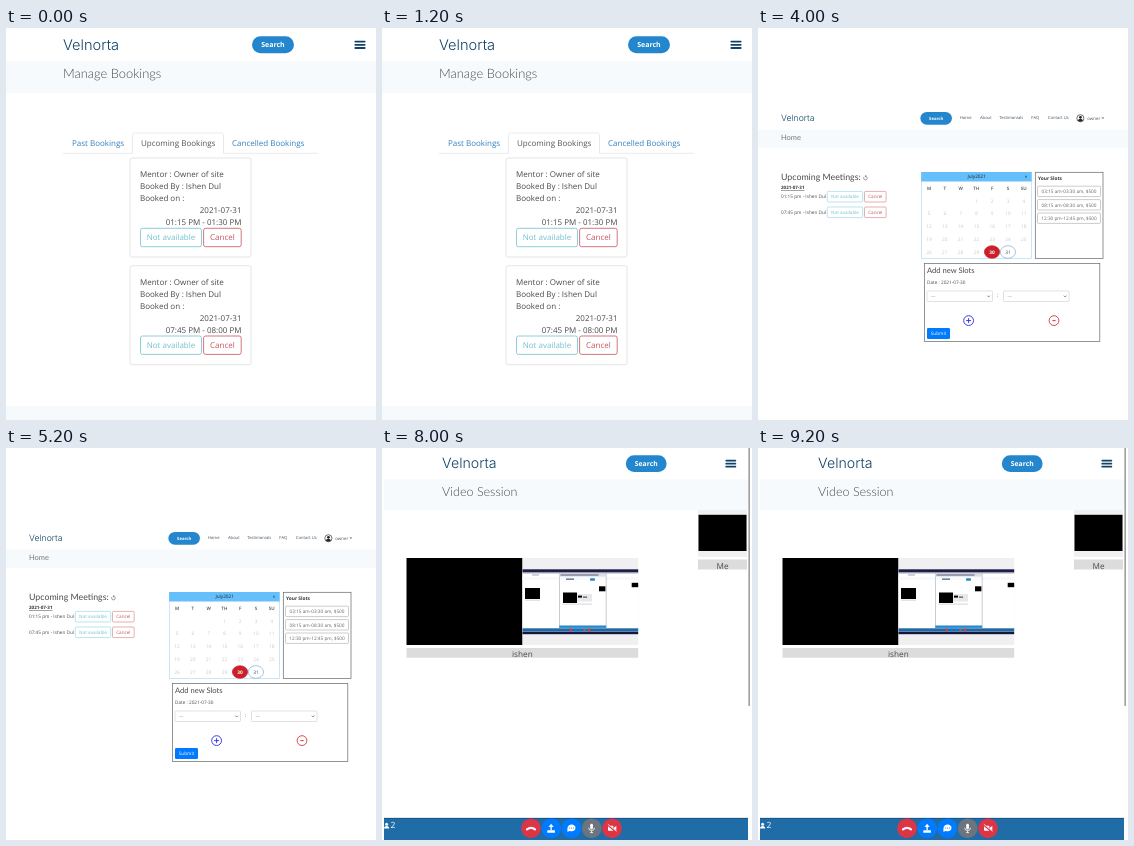
Recreate the animation shown at these times as an HTML page. Size 370x392 px, loop 10 s.

```html
<!DOCTYPE html>
<html lang="en">
<head>
<meta charset="utf-8">
<title>Booking walkthrough</title>
<style>
html, body { margin: 0; width: 100%; height: 100%; overflow: hidden; background: #fff; }
svg { display: block; width: 370px; height: 392px; }
text { font-family: "Open Sans", sans-serif; fill: #4a4a4a; white-space: pre; text-rendering: geometricPrecision; }
.head { font-family: Lato, sans-serif; }
.logo { font-family: Inter, sans-serif; }
.sans { font-family: "Liberation Sans", Arial, sans-serif; }
.blur { filter: blur(1.2px); }
</style>
</head>
<body>
<svg id="stage" viewBox="0 0 370 392" xmlns="http://www.w3.org/2000/svg"></svg>
<script>
const BRAND = 'Velnorta', PERSON = 'Ishen Dul', USER = 'owner', PAY = 'ZimLor';
const FIRST = PERSON.split(' ')[0];
const BLUE = '#2487ce', LINK = '#3481bd', NAVY = '#124265', BAND = '#f6fafd', RED = '#dc3545', ROSE = '#c9525d', TEAL = '#6fc2d0';
const SLOTS = ['03:15 am-03:30 am, $500', '08:15 am-08:30 am, $500', '12:30 pm-12:45 pm, $500'];

const attrs = o => Object.entries(o).map(([k, v]) => ` ${k}="${v}"`).join('');
const ink = c => ({ style: 'fill:' + c });
const bold = c => ({ 'font-weight': 700, ...ink(c) });
const text = (x, y, s, size, o = {}) =>
  `<text x="${x}" y="${y}" font-size="${size}"${attrs(o)}>${s.replace(/&/g, '&amp;')}</text>`;
const mid = (x, y, s, size, o = {}) => text(x, y, s, size, { 'text-anchor': 'middle', ...o });
const end = (x, y, s, size, o = {}) => text(x, y, s, size, { 'text-anchor': 'end', ...o });
const title = (x, y, s, size, o = {}) => text(x, y, s, size, { class: 'head', ...o });
const rect = (x, y, w, h, fill, o = {}) =>
  `<rect x="${x}" y="${y}" width="${w}" height="${h}" fill="${fill}"${attrs(o)}/>`;
const frame = (x, y, w, h, color, o = {}) => rect(x, y, w, h, 'none', { stroke: color, 'stroke-width': .7, ...o });
const disc = (x, y, r, fill, o = {}) => `<circle cx="${x}" cy="${y}" r="${r}" fill="${fill}"${attrs(o)}/>`;
const ring = (x, y, r, color, w) => disc(x, y, r, 'none', { stroke: color, 'stroke-width': w });
const line = (d, color, w = 1, o = {}) => `<path d="${d}" fill="none" stroke="${color}" stroke-width="${w}"${attrs(o)}/>`;
const shape = (d, fill) => `<path d="${d}" fill="${fill}"/>`;
const group = (transform, body) => `<g transform="${transform}">${body}</g>`;

const outline = (x, y, w, h, color, label, size) =>
  frame(x, y, w, h, color, { rx: size / 4, 'stroke-width': size / 10 }) +
  mid(x + w / 2, y + h / 2 + size * .35, label, size, ink(color));
const pill = (x, y, w, h, size) =>
  rect(x, y, w, h, BLUE, { rx: h / 2 }) + mid(x + w / 2, y + h / 2 + size * .36, 'Search', size, bold('#fff'));
const avatar = (x, y) =>
  disc(x, y, 3.9, '#fff', { stroke: '#222', 'stroke-width': .7 }) + disc(x, y - 1, 1.5, '#222') +
  shape(`M${x - 2.7} ${y + 2.7}q.3-2.3 2.7-2.3t2.7 2.3q-2.7 1.6-5.4 0z`, '#222');

// Header of the narrow layout
const narrowHead = name =>
  rect(-80, 33, 540, 32, BAND) +
  text(57, 21.7, BRAND, 14.6, { class: 'logo', 'font-weight': 300, ...ink(NAVY) }) +
  pill(246, 8.3, 42, 17, 7) +
  [13.6, 16.8, 20].map(y => line(`M349.3 ${y}h9.4`, NAVY, 1.8, { 'stroke-linecap': 'round' })).join('') +
  title(57, 50.4, name, 12.9, { 'font-weight': 300, ...ink('#4a4a4a') });

// Header of the wide layout, its origin at the left of the logo
const wideHead = () =>
  text(0, 3.5, BRAND, 9.5, { class: 'logo', 'font-weight': 300, ...ink(NAVY) }) +
  pill(152, -6.6, 34.4, 13.9, 4.6) +
  [['Home', 195], ['About', 217], ['Testimonials', 238], ['FAQ', 273], ['Contact Us', 291]]
    .map(([s, x]) => text(x, 1.4, s, 4.5, ink('#3d5263'))).join('') +
  avatar(326.5, .3) + text(334, 1.8, USER, 4.8, ink('#555')) + shape('M349.4 -.6h3.2l-1.6 1.8z', '#666');

function bookings() {
  const card = frame(124, 130, 121, 99, '#dadada', { rx: 2 }) +
    ['Mentor : Owner of site', 'Booked By : ' + PERSON, 'Booked on :'].map((s, i) => text(134, 149 + 12 * i, s, 8)).join('') +
    end(235.5, 185, '2021-07-31', 8);
  const keys = outline(134.5, 200.3, 61, 18.4, TEAL, 'Not available', 8) + outline(197.6, 200.3, 37.6, 18.4, ROSE, 'Cancel', 8);
  return narrowHead('Manage Bookings') +
    line('M57 125.3H126.5V107q0-2 2-2H215.5q2 0 2 2V125.3H312', '#dee2e6', .7) +
    text(66, 118, 'Past Bookings', 8, ink(LINK)) +
    text(135, 118, 'Upcoming Bookings', 8, ink('#555')) +
    text(226, 118, 'Cancelled Bookings', 8, ink(LINK)) +
    ['01:15 PM - 01:30 PM', '07:45 PM - 08:00 PM'].map((s, i) =>
      group(`translate(0 ${107.7 * i})`, card + end(235.5, 197, s, 8) + keys)).join('') +
    rect(0, 378, 370, 14, BAND);
}

function earnings() {
  const cols = [11, 72, 125.5, 218, 299.5], top = 170.5, step = 15.57;
  const rows = [
    ['21', '10:25', -10, -20], ['21', '10:08', -10, -10], ['20', '09:56', -40, 0], ['20', '09:54', -900, 40],
    ['20', '09:54', -50, 940], ['20', '09:53', -10, 990], ['20', '09:46', 500, 1000], ['20', '09:40', 500, 500]
  ];
  const cells = rows.map(([day, time, sum, left], i) =>
    ['2021-07-' + day, time + ' PM', sum < 0 ? 'Withdrawal' : 'Call with ' + PERSON, '' + sum, '' + left]
      .map((s, c) => text(cols[c], top + step * i + 9.4, s, 4.8, { 'font-weight': c ? 400 : 700, ...ink('#212529') })).join('') +
    line(`M6.5 ${top + step * (i + 1)}H359`, '#dee2e6', .6)).join('');
  return group('translate(6 58)', wideHead()) + rect(0, 71, 370, 19.5, BAND) +
    title(6.5, 82, 'Earnings', 8.2, ink('#666')) +
    title(6.5, 129, 'Earning so far : $ 1000', 8.2) + title(187.5, 130, 'Balance : $ 0', 8.5) +
    outline(235.5, 122, 31, 11.8, '#3b8fd0', 'Withdraw', 4.8) +
    end(359.3, 147.5, 'Pending Withdraw : $ 0', 4.8) +
    rect(6.5, 154.3, 352.7, 16.2, '#343a40') +
    ['Date', 'Time', 'Event', 'Transaction ($)', 'Balance ($)']
      .map((s, c) => text(cols[c], 164, s, 4.8, bold('#fff'))).join('') +
    [6.6, 68.3, 121.5, 214, 295.5, 359].map(x => line(`M${x} 170.5V295`, '#dee2e6', .6) +
      line(`M${x} 154.3v16.2`, '#454d55', .6)).join('') + cells +
    rect(0, 324, 370, 21.7, BAND) +
    text(6.5, 338.5, `© Copyright <tspan font-weight="700">${BRAND}</tspan>. All Rights Reserved`, 4.2) +
    [0, 1, 2, 3, 4].map(i => rect(291 + 13.9 * i, 333.3, 11.3, 11.3, BLUE, { rx: 1 })).join('');
}

function planner() {
  const day = n => [171 + 15.8 * ((n + 2) % 7), 174.5 + 12.9 * Math.floor((n + 2) / 7)];
  let dates = '';
  for (let n = 1; n < 30; n++) dates += mid(...day(n), '' + n, 4.8, ink('#c8c8c8'));
  const oval = (x, fill, stroke) => `<ellipse cx="${x}" cy="224" rx="7.6" ry="6.3" fill="${fill}" stroke="${stroke}" stroke-width=".7"/>`;
  const meeting = (y, time) => text(23, y, `${time} pm - ${PERSON}`, 4.7) +
    outline(69.3, y - 6.8, 35.4, 10.6, TEAL, 'Not available', 4.6) + outline(106.5, y - 6.8, 21.6, 10.6, ROSE, 'Cancel', 4.6);
  const select = x => frame(x, 263, 65.5, 10.5, '#d2d6da', { rx: 1 }) + text(x + 4, 269.8, '---', 4.6, ink('#777')) +
    line(`M${x + 60.3} 267.6l1.3 1.4 1.3-1.4`, '#444', .6);
  return group('translate(23 90) scale(.917)', wideHead()) + rect(0, 101.5, 370, 18.6, BAND) +
    title(23, 112.3, 'Home', 7.5, ink('#777')) +
    title(23, 151.5, 'Upcoming Meetings:', 8.8) +
    line('M106.1 148.9a1.8 1.8 0 1 0 2.7 0', '#555', .6) + shape('M107 147.2l2 .7-1.5 1.4z', '#555') +
    text(23, 161, '2021-07-31', 4.5, { 'text-decoration': 'underline', ...bold('#333') }) +
    meeting(170.2, '01:15') + meeting(185.8, '07:45') +
    frame(163.4, 144.3, 110, 86.2, '#a5d5f5', { 'stroke-width': .6 }) + rect(163.2, 144, 110.4, 9.5, '#64bffb') +
    mid(218.7, 150.3, 'July2021', 4.7, ink('#222')) + mid(268, 150.3, '»', 5, ink('#222')) +
    ['M', 'T', 'W', 'TH', 'F', 'S', 'SU'].map((s, i) => mid(171 + 15.8 * i, 161.7, s, 4.6, { 'font-weight': 600 })).join('') + dates +
    oval(234, '#c9202a', '#c9202a') + mid(234, 226, '30', 4.8, bold('#fff')) +
    oval(249.9, '#fff', '#7aaed6') + mid(249.9, 226, '31', 4.8) +
    frame(277.3, 144.3, 67.7, 86.2, '#666') + text(280, 152, 'Your Slots', 4.8, bold('#333')) +
    SLOTS.map((s, i) => frame(279.5, 158.2 + 13.4 * i, 63, 10.4, '#999', { rx: 1, 'stroke-width': .5 }) +
      mid(311, 165.1 + 13.4 * i, s, 4.7, ink('#666'))).join('') +
    frame(166.5, 235.5, 175.3, 78, '#666') + title(169, 244.5, 'Add new Slots', 7.6) +
    text(169, 256, 'Date : 2021-07-30', 4.7) + select(169) + text(239, 269.3, ':', 5) + select(245.5) +
    ring(210.6, 292.6, 4.9, '#2a2ae0', .9) + line('M208.1 292.6h5m-2.5-2.5v5', '#2a2ae0', .9) +
    ring(296, 292.6, 4.9, '#d3363c', .9) + line('M294.4 292.6h3.2', '#d3363c', 1) +
    rect(169, 300, 23, 11, '#007bff', { rx: 1.2 }) + mid(180.5, 307.2, 'Submit', 4.7, ink('#fff'));
}

function checkout() {
  const white = { class: 'sans', ...ink('#fff') };
  const cross = (x, y, r, c, w = .7) => line(`M${x - r} ${y - r}l${2 * r} ${2 * r}m0 ${-2 * r}l${-2 * r} ${2 * r}`, c, w);
  const veil = alpha => rect(0, 75.5, 369, 241, '#000', { 'fill-opacity': alpha });
  let dates = '';
  for (let n = 1; n < 30; n++) {
    const col = (n - 1) % 7;
    if (col < 4) dates += mid(252 + 17.3 * col, 186 + 14.5 * Math.floor(n / 7 - .01), '' + n, 4.8, ink('#bbb'));
  }
  const page = rect(0, 75.5, 369, 241, '#fff') + rect(127, 81.8, 34, 13, BLUE, { rx: 6.5 }) +
    text(272, 90.5, 'Contact Us', 4.5, ink(NAVY)) + avatar(309, 89) +
    text(317, 90.6, USER, 4.8) + shape('M336 88h4l-2 2.2z', '#444') +
    frame(160, 151, 155, 99, '#64bffb') + rect(160, 151, 155.3, 9.6, '#64bffb') + mid(307.5, 157.6, '»', 5) +
    ['TH', 'F', 'S', 'SU'].map((s, i) => mid(252 + 17.3 * i, 171, s, 4.8)).join('') + dates +
    disc(269.5, 242.3, 8.2, '#c9202a') + mid(269.5, 244, '30', 4.8, bold('#fff')) +
    ring(286.6, 242.3, 8, '#7aaed6', .7) + mid(286.6, 244, '31', 4.8) +
    line('M213 316.5V254.3H290.3V316.5', '#222', .8) + text(216, 262, 'Available Slots', 5, bold('#222')) +
    SLOTS.map((s, i) => frame(216, 269.5 + 15.8 * i, 71.5, 12.6, '#333', { rx: 1 }) + mid(251.7, 277.5 + 15.8 * i, s, 5.2)).join('');
  const modal = rect(100, 84.5, 168, 107, '#fff', { rx: 1.5 }) + cross(260, 94.5, 1.4, '#444') +
    line('M100 104.5h168M100 173h168', '#dee2e6', .5) +
    rect(110, 113, 153, 15, '#ffc439', { rx: 1.5 }) + end(196, 123, PAY, 7, bold('#0a5aa8')) +
    rect(110, 132.5, 153, 14.8, '#2c2e2f', { rx: 1.5 }) + end(214, 141.8, 'Debit or Credit Card', 5.2, ink('#fff')) +
    end(203, 156, 'Powered by ' + PAY, 4.8, ink('#0a5aa8')) + text(244, 182, 'Close', 5.4);
  const notice = end(208, 174, PAY, 11.5, { ...white, 'font-weight': 700 }) +
    end(239, 195.3, `Don’t see the secure ${PAY} browser? We’ll help`, 4.9, white) +
    end(233.5, 202.7, 'you re-launch the window to complete your', 4.9, white) +
    end(196, 210.2, 'purchase', 4.9, white) +
    end(205.5, 223.5, 'Click to Continue', 4.9, { ...white, 'font-weight': 700, 'text-decoration': 'underline' }) +
    cross(361.5, 84, 1.8, '#ddd', .8);
  const faint = (x, y, w, h = 4) => rect(x, y, w, h, '#f4f4f4', { rx: 1 });
  const ghost = '<g class="blur">' + rect(16, 110.5, 8, 9.5, '#b4d0e8') +
    text(26, 118.5, PAY, 8, bold('#c0d8ec')) +
    text(16, 138.5, `Hi ${FIRST}!`, 5, ink('#d4d4d4')) + text(16, 161, 'Send to', 6.6, ink('#d2d2d2')) +
    faint(16, 167.5, 72) + faint(16, 175, 109) + faint(16, 195.5, 151, 13) +
    [224, 245, 266].map(y => disc(21, y, 4.5, '#f2f2f2') + faint(30, y - 2, 10) + faint(45, y - 2, 104) + faint(45, y + 5, 55)).join('') + '</g>';
  const popup = rect(10.5, 85, 167.5, 217.2, '#fff', { rx: 1 }) +
    rect(14.5, 88.3, 3.3, 3.3, '#1b5fa8') + text(19.3, 91.7, PAY + ' Checkout - Ospeva Bronde', 4.1, ink('#333')) +
    line('M138 90h3.6', '#333', .6) + frame(153, 88.3, 3.4, 3.4, '#333', { 'stroke-width': .6 }) + cross(170.3, 90, 1.7, '#333', .6) +
    rect(10.5, 95.5, 167.5, 9, '#f3f4f5') + rect(15.5, 99.5, 3, 2.5, '#555') + line('M16.1 99.5v-.7q0-1 .9-1t.9 1v.7', '#555', .5) +
    text(22, 101.8, `sandbox.${PAY.toLowerCase()}.com/webapps/hermes?flow=1-P&ulReturn=true&sessi...`, 4.45, ink('#555')) + ghost +
    rect(172.5, 104.5, 5.2, 197.5, '#f1f1f1') + rect(173, 110, 4.3, 120, '#c1c1c1') +
    shape('M174 108.3h2.4l-1.2-1.6z', '#555') + shape('M174 298.3h2.4l-1.2 1.6z', '#555') +
    disc(90, 198, 16, '#fff', { stroke: '#c6c6c6', 'stroke-width': 1.3 }) +
    line('M75.7 205.2A16 16 0 0 1 83.5 183.4', '#0b78c4', 1.5) +
    frame(84.3, 195.8, 11.4, 10.2, '#bbb', { rx: 1 }) + line('M86.5 195.8v-2.5a3.5 3.5 0 0 1 7 0v2.5', '#bbb', .7) +
    disc(90, 200, 1, '#bbb') + line('M90 200v3', '#bbb', .7) +
    mid(91.3, 224, 'Processing...', 5.1, ink('#333'));
  return page + veil(.42) + modal + veil(.81) + notice + popup;
}

function session() {
  const label = (x, y, w, h, s) => rect(x, y, w, h, '#dcdcdc') + mid(x + w / 2, y + h - .3, s, 8.2);
  const keys = [[149, RED], [169.3, '#007bff'], [189.5, '#007bff'], [209.7, '#6c757d'], [230, RED]];
  const shared = rect(140.5, 110, 115.7, 87, '#f0f0f3') + rect(140.5, 121.5, 115.7, 62, '#fff') +
    rect(140.5, 121.3, 115.7, 3.3, '#1d1d45') + rect(140.5, 124.6, 115.7, 1.2, '#c9cbd6') +
    rect(140.5, 129, 115.7, 3, BAND) + rect(150, 126.6, 7, .8, '#8394ad') + rect(208, 131, 5, 1.7, BLUE, { rx: .8 }) +
    rect(143, 140, 15, 11, '#000') + rect(143, 151.6, 15, 1.2, '#ddd') + rect(249.7, 134.8, 6.5, 4.4, '#000') +
    frame(177.3, 125, 46.8, 54.8, '#999', { 'stroke-width': .5 }) + rect(177.3, 125.5, 46.8, 3.2, '#dcdee6') +
    rect(178.5, 126.6, 38, .8, '#34345a') + rect(184, 130.6, 8, 1, NAVY) + rect(208, 130.2, 5, 1.7, BLUE, { rx: .8 }) +
    rect(181, 144.5, 14, 10.5, '#000') + rect(195, 146, 15, 7.5, '#e8e8ec') + rect(196, 147.6, 4, 2, '#000') + rect(201, 148.6, 4, 1, '#333') +
    rect(181, 155.5, 29, 1.2, '#ddd') + rect(217, 138.3, 6.4, 5, '#000') +
    rect(177.3, 177.5, 46.8, 2.3, BLUE) + rect(140.5, 180.3, 115.7, 3.3, '#1f6aa5') +
    keys.map(([, c], i) => disc(189 + 4.5 * i, 181.9, 1.3, c)).join('') +
    rect(140.5, 183.8, 115.7, 2.4, '#16163a');
  const phone = line('M145 381.4q4-3 8 0', '#fff', 2.2, { 'stroke-linecap': 'round' });
  const share = line('M165.3 383.5h7.6', '#fff', 2.5) + line('M169.1 382v-4', '#fff', 1.4) + shape('M166.5 379h5.2l-2.6-3.3z', '#fff');
  const chat = shape('M185.5 380a4 3.4 0 1 1 2.3 3l-2.5.8z', '#fff') + [187.7, 189.5, 191.3].map(x => disc(x, 380, .55, '#007bff')).join('');
  const mic = rect(208.2, 375.8, 2.8, 5.6, '#fff', { rx: 1.4 }) + line('M206.7 379.7a2.9 2.9 0 0 0 5.8 0m-2.9 2.9v2m-1.5 0h3', '#fff', .8);
  const cam = rect(226, 377.8, 5.4, 5, '#fff', { rx: .8 }) + shape('M232 379.5l2.3-1.4v4.4l-2.3-1.4z', '#fff') +
    line('M225.5 376.8l8.8 7', RED, 1.8) + line('M225.8 376.3l8.8 7', '#fff', .8);
  return group('translate(4.7 -.7) scale(.972)', narrowHead('Video Session')) + rect(0, 0, 2, 392, '#fff') + rect(366, 0, 4, 392, '#fff') +
    rect(366.5, 0, 1.3, 258, '#888') +
    rect(316, 62, 49, 47, '#f0f0f3') + rect(316.5, 66.8, 48, 36.2, '#000') + label(316, 111.5, 49, 10, 'Me') +
    rect(24.5, 110, 116, 87, '#000') + shared + label(24.5, 200, 231.7, 9.7, FIRST.toLowerCase()) +
    rect(2, 370, 364, 22, '#1f6ca7') + line('M2 370.3h364', '#164a73', .7) +
    disc(4.6, 376.2, 1.5, '#fff') + shape('M2 380.5q0-2.6 2.6-2.6t2.6 2.6z', '#fff') + text(8.5, 380.3, '2', 8.5, ink('#fff')) +
    keys.map(([x, c]) => disc(x, 380.3, 9.9, c)).join('') + phone + share + chat + mic + cam;
}

const HOLD = 2000;
const stage = document.getElementById('stage');
stage.innerHTML = [bookings, earnings, planner, checkout, session].map(draw => `<g>${draw()}</g>`).join('');
const scenes = [...stage.children];

function tick() {
  const now = Math.floor(performance.now() / HOLD) % scenes.length;
  scenes.forEach((g, i) => g.style.display = i === now ? '' : 'none');
  requestAnimationFrame(tick);
}
tick();
</script>
</body>
</html>
```
